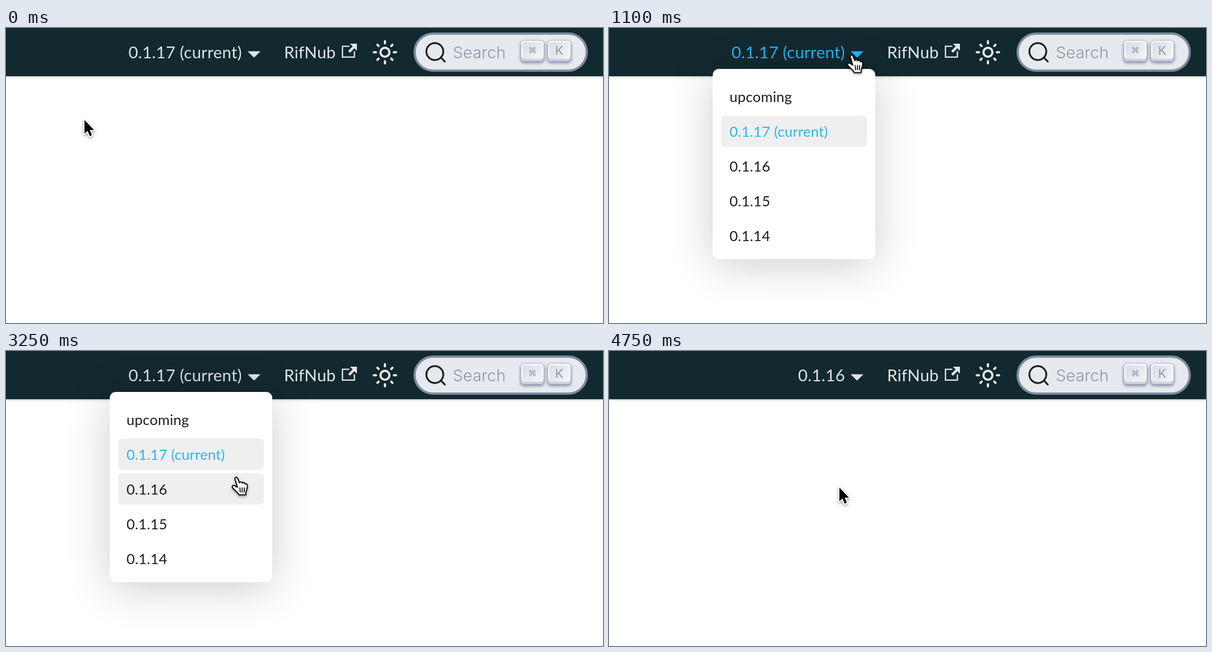
Recreate the animation shown at these times as an HTML page. Size 1065 by 526 pixels, loop 5500 ms.

```html
<!DOCTYPE html>
<html lang="en">
<head>
<meta charset="utf-8">
<title>Version menu</title>
<style>
  html, body { margin: 0; width: 100%; height: 100%; overflow: hidden; background: #fff; }
  body { position: relative; font-family: Lato, "Open Sans", sans-serif; }
  svg, #nav, #menu, .row, .pill, .key { position: absolute; box-sizing: border-box; }
  svg { left: 0; top: 0; width: 1065px; height: 526px; }
  #nav { left: 0; top: 0; width: 1065px; height: 86px; background: #122930; box-shadow: 0 2px 4px rgba(0, 0, 0, .18); }
  .label { font-size: 29.5px; letter-spacing: .25px; fill: #e4e8e9; }
  .pill { left: 727px; top: 8px; width: 311px; height: 70px; border: 4px solid #7c8b9c; border-radius: 35px; background: #e6e9ed; }
  .key {
    top: 23px; width: 40px; height: 36px; border-radius: 6px; color: #8f98a8;
    font: 22px/34px Inter, sans-serif; text-align: center;
    background: linear-gradient(135deg, #d5dbe4, #f8f8f8);
    box-shadow: inset 0 -4px 0 #cdcde6, inset 0 0 2px 2px #fff, 0 2px 4px 2px rgba(30, 35, 90, .4);
  }
  #menu { left: 185px; top: 73px; width: 290px; height: 339px; border-radius: 11px; background: #fff; box-shadow: 0 10px 80px rgba(0, 0, 0, .2); }
  .row { left: 15px; width: 260px; height: 56px; padding-left: 15px; border-radius: 7px; font-size: 25.5px; line-height: 56px; letter-spacing: .25px; color: #1c1e21; }
  .row.current { color: #2cb5ef; }
  .row.lit { background: #efefef; }
  .cursor { filter: drop-shadow(0 2px 2px rgba(0, 0, 0, .4)); }
</style>
</head>
<body>
<div id="nav"></div>
<div class="pill"></div>
<div class="key" style="left:919px;font:15px/34px 'DejaVu Sans',sans-serif">⌘</div>
<div class="key" style="left:967px">K</div>

<svg viewBox="0 0 1065 526">
  <g id="version">
    <text id="versionText" class="label" x="421" y="54" text-anchor="end" style="fill:inherit"></text>
    <path d="M431 41.5H454L442.5 52.7Z"/>
  </g>
  <text class="label" x="496" y="54">RifNub</text>
  <g fill="none" stroke="#e4e8e9" stroke-width="2.3">
    <path d="M612.5 32.6H600.2V51.8H621.5V41.6"/>
    <path d="M612 42.5L622 32.3" stroke-width="4.5"/>
    <path d="M613.6 28H626V40.5Z" fill="#e4e8e9" stroke="none"/>
  </g>
  <g id="sun" transform="translate(676 43.3)" fill="none" stroke="#e4e8e9" stroke-width="4" stroke-linecap="round">
    <circle r="8"/>
  </g>
  <g fill="none" stroke="#1c1e21" stroke-width="3.2" stroke-linecap="round">
    <circle cx="765" cy="42" r="15.1"/>
    <path d="M775.7 52.7L782.8 59.8"/>
  </g>
  <text x="797" y="54" font-family="Inter, sans-serif" font-size="29" font-weight="300" fill="#8c98aa">Search</text>
</svg>

<div id="menu"></div>

<svg viewBox="0 0 1065 526">
  <circle id="click" cx="410" cy="243.5" fill="#ff403a" fill-opacity=".98"/>
  <g id="arrow" class="cursor">
    <path d="M0 .6V25L5.5 20L9.5 29.3L13.3 27.6L9.4 18.5H17.2Z" stroke="#fff" stroke-width="3.8" stroke-linejoin="round" paint-order="stroke"/>
  </g>
  <g id="hand" class="cursor" stroke="#111" stroke-width="2.1" stroke-linecap="round" stroke-linejoin="round">
    <path fill="#fff" d="M-2.3 5C-3.8 1 .8 -.2 2.2 3L5.6 11C7 8.6 10 9.2 10.6 11.4C12.8 9.8 15.3 10.8 15.8 13.2C18.3 12.2 19.8 14 19.6 17C19.6 22 17.5 25 17 28L16.6 32.5H4.5C3.5 28.5 -2.5 25 -6.3 20.5C-9 17.4 -6.2 14.2 -3 16.2L1.8 19Z"/>
    <path fill="none" stroke-width="1.8" d="M6.3 20L6.8 27.5M10.3 20V27.5M14.2 20L13.8 27.5"/>
  </g>
</svg>

<script>
const LOOP = 5500, STEP = 50;
const OPEN = 700, LEAVE_LABEL = 2250, CLICK = 4100, RELOAD = 4300;
const ROW_TOP = 94, ROW_PITCH = 62, ROW_HEIGHT = 56;
const versions = ["upcoming", "0.1.17 (current)", "0.1.16", "0.1.15", "0.1.14"];

// Pointer path: [ms, x, y]
const path = [
  [0, 140, 163.5], [300, 239, 130], [600, 335, 95.5], [650, 340, 87],
  [800, 372, 63], [1100, 433, 47], [2050, 433, 47], [2300, 423, 81],
  [2550, 413, 124], [2650, 412, 141], [2950, 411, 186], [3250, 411, 224],
  [3550, 409.5, 244], [LOOP, 409.5, 244]
];

const $ = id => document.getElementById(id);
const clamp = v => Math.min(1, Math.max(0, v));
const ramp = (t, start, length) => clamp((t - start) / length);

for (let i = 0; i < 8; i++) {
  const [from, to] = i % 2 ? [16, 19] : [16, 19.8];
  $("sun").insertAdjacentHTML("beforeend", `<path d="M${from} 0H${to}" transform="rotate(${i * 45})"/>`);
}

const rows = versions.map((name, i) => {
  const row = document.createElement("div");
  row.className = "row";
  row.classList.toggle("current", i === 1);
  row.style.top = ROW_TOP - 73 + i * ROW_PITCH + "px";
  row.textContent = name;
  return $("menu").appendChild(row);
});
const keys = document.querySelectorAll(".key");

function tangent(i, axis) {
  const before = path[i - 1], here = path[i], after = path[i + 1];
  if (!before || !after || before[axis] === here[axis] || after[axis] === here[axis]) return 0;
  return (after[axis] - before[axis]) / (after[0] - before[0]);
}

// Cubic Hermite interpolation along one axis
function position(t, axis) {
  const i = path.findIndex((p, k) => k < path.length - 1 && t < path[k + 1][0]);
  const a = path[i], b = path[i + 1], span = b[0] - a[0], u = (t - a[0]) / span;
  const blend = u * u * (3 - 2 * u);
  return a[axis] + (b[axis] - a[axis]) * blend
    + span * u * (1 - u) * (tangent(i, axis) * (1 - u) - tangent(i + 1, axis) * u);
}

function mix(from, to, amount) {
  return `rgb(${from.map((c, i) => Math.round(c + (to[i] - c) * amount))})`;
}

function draw(t) {
  const x = position(t, 1), y = position(t, 2);
  const reloaded = t >= RELOAD;
  const open = t >= OPEN && !reloaded;
  const shown = open ? ramp(t, OPEN - STEP, 200) : 0;

  $("menu").style.opacity = shown;
  $("menu").style.transform = `translateY(${-20 * (1 - shown)}px)`;
  rows.forEach((row, i) => {
    const offset = y - ROW_TOP - i * ROW_PITCH;
    row.classList.toggle("lit", i === 1 || (offset >= 0 && offset <= ROW_HEIGHT));
  });

  const blue = ramp(t, OPEN - STEP, 200) - ramp(t, LEAVE_LABEL, 200);
  $("version").style.fill = mix([222, 228, 228], [31, 182, 243], blue);
  $("versionText").textContent = versions[reloaded ? 2 : 1];
  const remounting = reloaded && t < RELOAD + STEP;
  keys.forEach(key => key.style.visibility = remounting ? "hidden" : "visible");

  $("click").setAttribute("r", t < CLICK ? 0 : 47 * (1 - ramp(t, CLICK, 610)));
  for (const id of ["arrow", "hand"]) {
    $(id).setAttribute("transform", `translate(${x + (reloaded ? 1.5 : 0)} ${y - (reloaded ? 1 : 0)})`);
    $(id).style.display = (id === "hand") === open ? "" : "none";
  }
}

const start = performance.now();
function tick() {
  const t = (performance.now() - start) % LOOP;
  draw(Math.floor(t / STEP) * STEP);
  requestAnimationFrame(tick);
}
tick();
</script>
</body>
</html>
```
